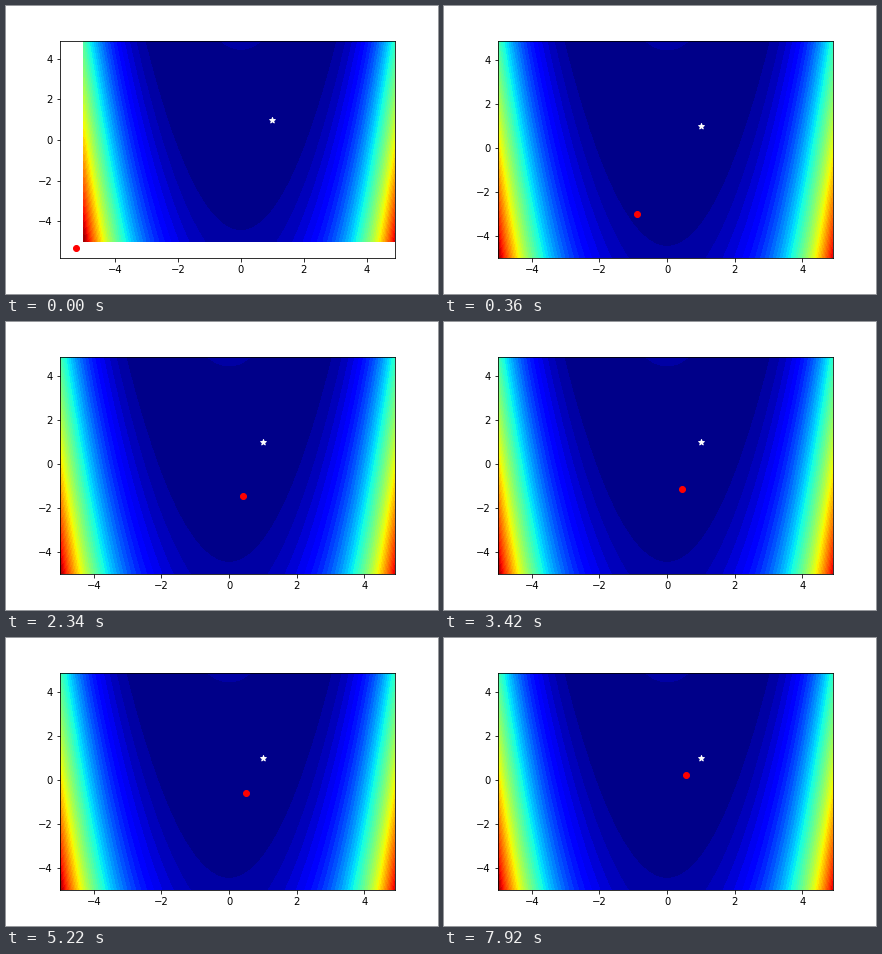
Animation, 432 px wide and 288 px high, one loop 8 s. Source, as a matplotlib script:

```python
import numpy as np
import matplotlib.pyplot as plt
from matplotlib.animation import FuncAnimation

LOOP_MS, TICK_MS, STEP_MS = 8000, 40, 180
LOW, HIGH = -5.0, 4.9
START = (-5.25, -5.31)
SWING = 0.42


def rosenbrock(x, y):
    return (1 - x) ** 2 + 100 * (y - x ** 2) ** 2


def approach(step, start, base, drift, damping):
    """Damped swing from start onto a line that drifts slowly."""
    swing = np.exp(-damping * step) * np.cos(SWING * step)
    return base + drift * step + (start - base) * swing


def position(step):
    return (approach(step, START[0], 0.365, 0.0045, 0.543),
            approach(step, START[1], -2.132, 0.0538, 0.386))


def lower_limit(value):
    """Add a 5 % margin when the point lies outside the plotted field."""
    return value - 0.05 * (HIGH - value) if value < LOW else LOW


fig = plt.figure(figsize=(6, 4), dpi=72, facecolor="white")
ax = fig.add_axes([0.125, 0.125, 0.775, 0.755])
grid = np.linspace(LOW, HIGH, 100)
xs, ys = np.meshgrid(grid, grid)
ax.contourf(xs, ys, rosenbrock(xs, ys), 50, cmap="jet")
ax.scatter([1], [1], marker="*", color="white", zorder=3)
point = ax.scatter([START[0]], [START[1]], color="red", zorder=4)
ax.set_xticks(range(-4, 5, 2))
ax.set_yticks(range(-4, 5, 2))


def update(frame):
    # Sampling mid-tick keeps each step from starting late
    x, y = position((frame * TICK_MS + TICK_MS // 2) // STEP_MS)
    point.set_offsets([(x, y)])
    ax.set_xlim(lower_limit(x), HIGH)
    ax.set_ylim(lower_limit(y), HIGH)
    return [point]


anim = FuncAnimation(fig, update, frames=LOOP_MS // TICK_MS,
                     interval=TICK_MS, repeat=True, repeat_delay=0)
plt.show()
```
